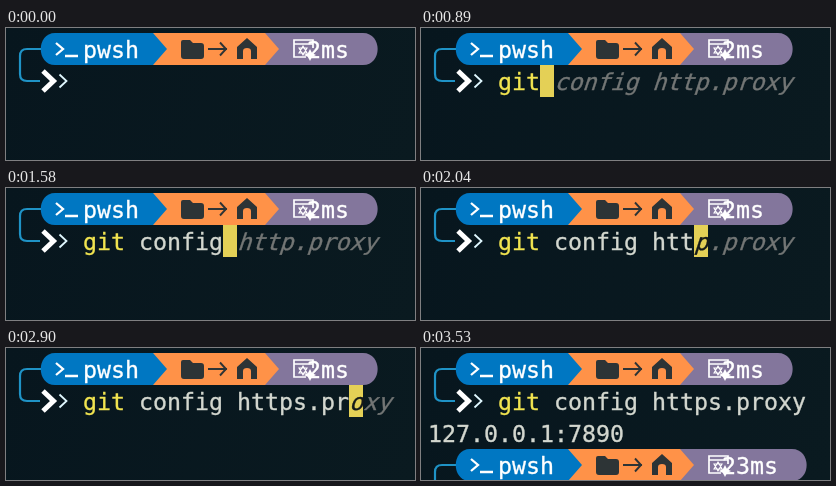
An HTML page with a canvas for the animation above (5570 ms loop, 409 by 132 pixels).

```html
<!DOCTYPE html>
<html lang="en">
<head>
<meta charset="utf-8">
<title>Terminal</title>
<style>
  html, body { margin: 0; width: 100%; height: 100%; overflow: hidden; background: #08181f; }
  canvas { display: block; width: 409px; height: 132px; }
</style>
</head>
<body>
<canvas id="stage" width="409" height="132"></canvas>
<script>
const ctx = document.getElementById('stage').getContext('2d');
const LOOP = 5570, CELL = 14, ROW = 32, LEFT = 7, TOP = 5, BASELINE = 25;
const FONT = '23.25px "DejaVu Sans Mono", "Noto Sans Mono", monospace';
const COLOR = {
  shell: '#0077c2', path: '#ff9248', time: '#83769c', ink: '#2d3436',
  line: '#1f93c6', text: '#d3d7cf', command: '#f1e450', hint: '#737675',
  cursor: '#e4d056', underCursor: '#14191a', white: '#ffffff'
};
const HISTORY = 'git config http.proxy';
const INPUT_COL = 5;

// Each burst types its text at an even pace.
const BURSTS = [
  { text: 'git ', at: 730, gap: 80 },
  { text: 'config ', at: 1160, gap: 84 },
  { text: 'https', at: 1840, gap: 100 },
  { text: '.', at: 2570, gap: 100 },
  { text: 'proxy', at: 2800, gap: 105 * 0.95 }
];
const COMMAND = BURSTS.map(burst => burst.text).join('');
const CURSOR_ON = 530, ENTER = 3430, OUTPUT = 3480, NEXT_PROMPT = 3530;

const colX = col => LEFT + col * CELL;
const rowY = row => TOP + row * ROW;

function typedAt(time) {
  return BURSTS.map(({ text, at, gap }) =>
    text.slice(0, Math.max(0, Math.floor((time - at) / gap) + 1))).join('');
}

function write(text, col, row, color, slant = 0) {
  ctx.save();
  ctx.transform(1, 0, -slant, 1, colX(col), rowY(row) + BASELINE);
  ctx.font = FONT;
  ctx.fillStyle = ctx.strokeStyle = color;
  ctx.lineWidth = 0.35;
  ctx.fillText(text, 0, 0);
  ctx.strokeText(text, 0, 0);
  ctx.restore();
}

const writeHint = (text, col, color) => write(text, col, 1, color, 0.33);

function fill(path, color) {
  ctx.fillStyle = color;
  ctx.fill(new Path2D(path));
}

function stroke(path, color, width) {
  ctx.strokeStyle = color;
  ctx.lineWidth = width;
  ctx.stroke(new Path2D(path));
}

const chevron = (x, y, w, h) => `M${x} ${y - h}L${x + w} ${y}L${x} ${y + h}`;

function drawIcons() {
  // shell
  stroke(chevron(50, 16, 7, 6) + 'M59 23H72', COLOR.white, 2.3);
  // folder, arrow, home
  fill('M177 7H184L187 10H195Q198 10 198 13V23Q198 26 195 26H178Q175 26 175 23V9Q175 7 177 7Z', COLOR.ink);
  stroke('M202 16H221' + chevron(214, 16, 6, 6.5), COLOR.ink, 1.9);
  fill('M241 5L251 14V26H245V18Q245 15 241 15Q237 15 237 18V26H231V14Z', COLOR.ink);
  // timer
  stroke('M300 24H288V7H307V15M288 11H307', COLOR.white, 1.7);
  stroke('M297 13L301 20H293ZM297 22L293 15H301Z', COLOR.white, 1.1);
  fill('M304 16L306 20L310 22L306 24L304 28L302 24L298 22L302 20Z', COLOR.white);
}

function drawPrompt(row, duration) {
  const end = colX(22 + duration.length);
  ctx.save();
  ctx.translate(0, rowY(row));
  fill(`M259 0H${end}C${end + 19.5} 0 ${end + 19.5} 32 ${end} 32H259Z`, COLOR.time);
  fill('M147 0H259L273 16L259 32H147Z', COLOR.path);
  fill('M49 0H147L161 16L147 32H49C30 32 30 0 49 0Z', COLOR.shell);
  stroke('M35 16H21Q14 16 14 23V41Q14 48 21 48H34', COLOR.line, 2.2);
  stroke(chevron(37, 48, 10.5, 10), COLOR.white, 5);
  stroke(chevron(53.5, 48, 7, 6.5), '#e0f8ff', 1.8);
  drawIcons();
  ctx.restore();
  write('pwsh', 5, row, COLOR.white);
  write(duration, 21, row, COLOR.white);
}

function drawInput(time) {
  const typed = typedAt(time);
  const col = INPUT_COL + typed.length;
  const match = HISTORY.startsWith(typed) ? HISTORY : COMMAND;
  const rest = typed && match.slice(typed.length);
  write(typed.slice(0, 3), INPUT_COL, 1, COLOR.command);
  write(typed.slice(3), INPUT_COL + 3, 1, COLOR.text);
  writeHint(rest.slice(1), col + 1, COLOR.hint);
  if (time >= CURSOR_ON && time < ENTER) {
    ctx.fillStyle = COLOR.cursor;
    ctx.fillRect(colX(col), rowY(1), CELL, ROW);
    writeHint(rest.slice(0, 1), col, COLOR.underCursor);
  }
}

function drawBackground() {
  const shade = ctx.createLinearGradient(0, 0, 409, 132);
  shade.addColorStop(0, '#07161e');
  shade.addColorStop(1, '#0a1a20');
  ctx.fillStyle = shade;
  ctx.fillRect(0, 0, 409, 132);
}

function draw(time) {
  drawBackground();
  drawPrompt(0, '2ms');
  drawInput(time);
  if (time >= OUTPUT) write('127.0.0.1:7890', 0, 2, COLOR.text);
  if (time >= NEXT_PROMPT) drawPrompt(3, '23ms');
}

const start = performance.now();
function tick() {
  draw((performance.now() - start) % LOOP);
  requestAnimationFrame(tick);
}
tick();
</script>
</body>
</html>
```
